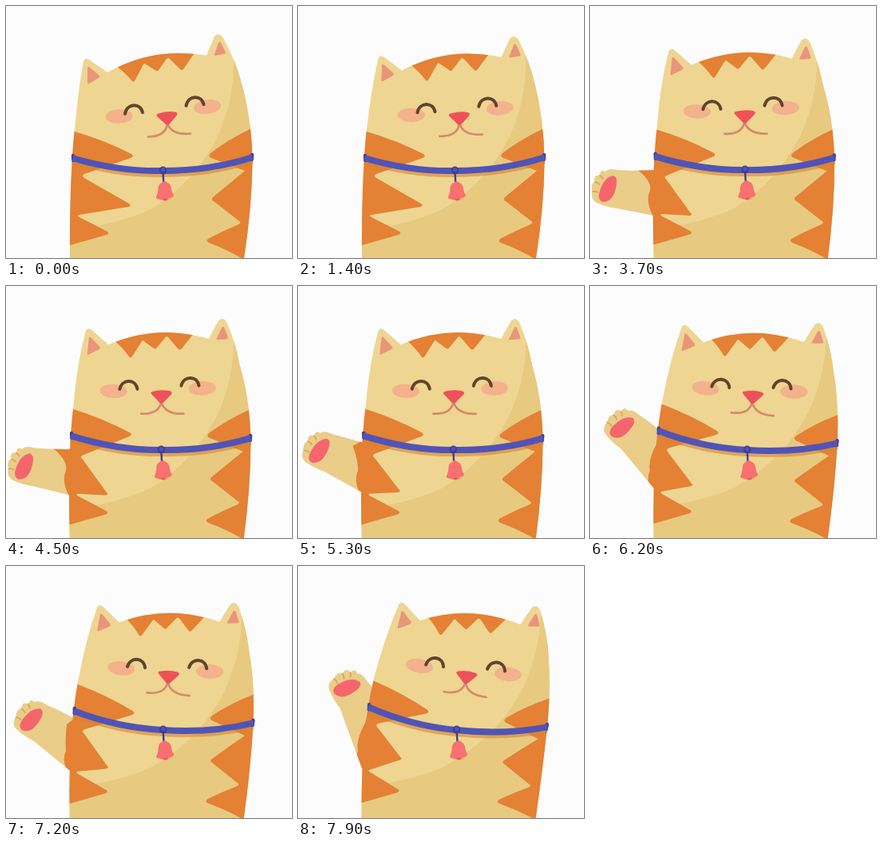
Write an HTML page with a canvas that moves like this. It is 358x315 px and loops after 8000 ms.

```html
<!DOCTYPE html>
<html lang="en">
<head>
<meta charset="utf-8">
<title>Waving cat</title>
<style>
html, body { margin: 0; width: 100%; height: 100%; overflow: hidden; background: #fcfcfc; }
canvas { display: block; width: 358px; height: 315px; }
</style>
</head>
<body>
<canvas id="stage"></canvas>
<script>
const W = 358, H = 315, LOOP = 8000, STEP = 100;
const canvas = document.getElementById('stage');
const ctx = canvas.getContext('2d');
const dpr = window.devicePixelRatio || 1;
canvas.width = W * dpr;
canvas.height = H * dpr;

const C = {
  bg: '#fcfcfc', fur: '#eed592', shade: '#e7ca7f', arm: '#e9cd89', stripe: '#e48134', ear: '#e9957a',
  blush: '#f3b28b', eye: '#62432c', nose: '#ee5159', mouth: '#d18c69',
  collar: '#5054b6', collarDark: '#3d3f93', shadow: 'rgba(214,134,48,.6)',
  bell: '#f9706f', bellDark: '#ea5560', pad: '#f4666c', toe: '#d9a255'
};

// Motion tables: [time, value], eased between turning points
const ARM = [[2800, 10], [3250, 28], [3700, 0], [4075, 35], [4450, 0], [4825, 35], [5170, 3],
  [5575, 40], [5950, 2], [6370, 42], [6700, 2], [7000, 42], [7360, 3], [7850, 46], [8200, 10]];
const REACH = [[2800, 0], [3250, 1]];
const LEAN = [[3700, 0], [4300, .08], [4750, 0], [5230, 0], [5575, .7], [5950, .3], [6370, .75],
  [6700, .45], [7000, .95], [7360, .3], [7850, 1]];
const EYES = [[0, 1], [2300, 1], [2700, .42], [3000, 1]];

// Poses: head turn, dx, dy, collar turn, dx, dy, face turn
const REST = [0, 0, 0, 0, 0, 0, 0];
const TURN = [4, .5, .3, 0, 0, 0, 3.6];
const LOW = [6, -8, -2, .7, -2.5, -1, 4];
const HIGH = [12, 9, -1, 6.6, 2.5, -1, 11.5];

const clamp = v => Math.max(0, Math.min(1, v));
const mix = (a, b, u) => a + (b - a) * u;
const blend = (a, b, u) => a.map((v, i) => mix(v, b[i], u));
const ease = u => (1 - Math.cos(Math.PI * clamp(u))) / 2;

function track(rows, t) {
  if (t <= rows[0][0]) return rows[0][1];
  for (let i = 1; i < rows.length; i++) {
    const [t0, a] = rows[i - 1], [t1, b] = rows[i];
    if (t <= t1) return mix(a, b, ease((t - t0) / (t1 - t0)));
  }
  return rows[rows.length - 1][1];
}

function spin(x, y, cx, cy, deg, scale = 1) {
  const r = deg * Math.PI / 180, c = Math.cos(r) * scale, s = Math.sin(r) * scale;
  return [cx + (x - cx) * c - (y - cy) * s, cy + (x - cx) * s + (y - cy) * c];
}

function poseAt(t) {
  if (t <= 2700) return blend(REST, TURN, t / 2700);
  if (t < 3700) return blend(TURN, LOW, ease((t - 2700) / 900));
  return blend(LOW, HIGH, track(LEAN, t));
}

// Point maps: the trunk bends up to the collar, the skin also follows the head, the face is rigid
function mapsFor([turn, dx, dy, collarTurn, cx, cy, faceTurn]) {
  const trunk = (x, y) => {
    const [nx, ny] = spin(x, y, 196, 204, collarTurn);
    return blend([x, y], [nx + cx, ny + cy], clamp((320 - y) / 120));
  };
  const skin = (x, y) => {
    const [hx, hy] = spin(x, y, 202, 155, turn);
    return blend(trunk(x, y), [hx + dx, hy + dy], ease((165 - y) / 85));
  };
  const face = (x, y) => {
    const [fx, fy] = spin(x, y, 202, 140, faceTurn);
    return [fx + dx, fy + dy];
  };
  return { trunk, skin, face };
}

const shape = (d, map) => new Path2D(
  d.replace(/(-?[\d.]+) (-?[\d.]+)/g, (m, x, y) => map(+x, +y).map(v => v.toFixed(2)).join(' ')));

function fill(path, color) {
  ctx.fillStyle = color;
  ctx.fill(path);
}

function line(path, color, width, cap = 'round') {
  ctx.strokeStyle = color;
  ctx.lineWidth = width;
  ctx.lineCap = cap;
  ctx.lineJoin = 'round';
  ctx.stroke(path);
}

function oval(x, y, rx, ry, deg, color) {
  ctx.fillStyle = color;
  ctx.beginPath();
  ctx.ellipse(x, y, rx, ry, deg * Math.PI / 180, 0, 2 * Math.PI);
  ctx.fill();
}

// Draws the arm and returns its outline
function drawArm(angle, reach) {
  const swing = (x, y) => spin(x, y, 136, 238, angle, mix(.3, 1, reach));
  const pt = (x, y) => swing(x, y).join(' ');
  const arm = new Path2D(`M108 203 Q${pt(64, 207)} ${pt(34, 205)} Q${pt(24, 202)} ${pt(19, 207)}` +
    `Q${pt(13, 203)} ${pt(12, 212)} Q${pt(4, 210)} ${pt(6, 220)} Q${pt(0, 222)} ${pt(3, 232)}` +
    `Q${pt(0, 243)} ${pt(11, 247)} Q${pt(20, 251)} ${pt(34, 253)}` +
    `L80 ${mix(262, 253, clamp(angle / 27))} L110 262 Z`);
  fill(arm, C.arm);
  line(shape('M12 212 Q15 213 16 216 M6 220 Q9 220 12 223 M3 232 Q6 231 10 233', swing), C.toe, 1.6);
  fill(shape('M29 212 Q36 214 32 229 Q28 245 16 245 Q8 242 13 229 Q18 214 29 212 Z', swing), C.pad);
  return arm;
}

// Orange patch that joins the arm to the body stripe
function drawShoulder(arm, angle) {
  const u = clamp(angle / 27), x = mix(57, 84, u), y = mix(203, 196, u);
  ctx.save();
  ctx.clip(arm);
  fill(new Path2D(`M${x} ${y} Q${mix(78, 72, u)} 218 75 231 Q69 243 79 263 L86 263 L86 190 Z`), C.stripe);
  ctx.restore();
}

function drawBody({ trunk, skin, face }, angle, reach) {
  const body = shape('M80 332 L80 315 Q79.5 240 83 190 Q84 168 86.5 150 Q90 108 97 69 Q99 64 104 67' +
    'L127 83 Q170 59 214 59 Q236 59 251 62 Q256 49 261 38 Q266 32 272 40 Q287 68 293 90' +
    'Q308 140 308.5 195 Q308 250 298 315 L296 332 Z', skin);
  fill(body, C.fur);
  ctx.save();
  ctx.clip(body);
  fill(shape('M284 45 Q290 110 264 165 Q236 220 183 253 Q142 273 75 281 L75 340 L320 340 L350 45 Z', trunk), C.shade);
  // The middle stripe is pulled along by the arm
  const u = angle / 45;
  const tx = mix(156, mix(129, 131, u), reach), ty = mix(250, mix(262, 247, u), reach);
  const ny = mix(212, mix(216, 210, u), reach);
  fill(shape('M60 149 L86 157 Q124 168 157 185 Q161 188 156 190 ' +
    `L98 ${ny - 2} Q94 ${ny} 98 ${ny + 3}` +
    `L${tx - 2} ${ty - 3} Q${tx + 2} ${ty} ${tx - 3} ${ty + 1} L92 261 Q88 262 92 264` +
    'L127 282 Q130 284 126 286 L80 299 L60 305 Z', skin), C.stripe);
  fill(shape('M325 143 L307 153 Q278 167 256 184 Q252 188 257 190 L299 206 Q282 220 259 239' +
    'Q256 242 260 244 L292 269 Q295 271 291 273 Q270 282 253 291 Q250 294 254 296' +
    'Q276 304 298 317 L325 330 Z', skin), C.stripe);
  fill(shape('M138 75 Q150 84 158 94 Q160 96 162 92 L172 73 Q173 71 175 73 L188 81 Q190 82 191 80' +
    'L201 66 Q203 64 205 66 L218 79 Q220 81 222 79 L238 56 L200 45 L136 60 Z', face), C.stripe);
  ctx.restore();
  fill(shape('M102 77 Q103 75 105 77 L117 87 Q118 88 116 90 L104 97 Q102 98 102 96 Z', skin), C.ear);
  fill(shape('M266 46 Q267 44 269 46 L275 58 Q275 60 273 60 L262 62 Q260 62 261 60 Z', skin), C.ear);
}

function drawFace(at, turn, open) {
  for (const [x, y, a] of [[141.5, 138, -2], [252, 126, -7]]) {
    const [bx, by] = at(x, y);
    oval(bx, by, 17, 8.8, turn + a, C.blush);
  }
  for (const [x, y] of [[160, 134], [236.5, 124]]) {
    const lift = 12.5 * open, base = y - 3 * (1 - open);
    line(shape(`M${x - 11} ${base + .8} C${x - 9} ${base - lift} ${x + 8} ${base - lift - 1} ${x + 11} ${base - 1}`, at),
      C.eye, 4);
  }
  line(shape('M202 147 Q200 163 178 163.5 M202 147 Q208 162 231 159.5', at), C.mouth, 2.7);
  fill(shape('M191 134.5 Q202 131 212 132.5 Q216 133.5 213.5 137 L205 147 Q202 150.5 199 147' +
    'L189 138 Q187 135.5 191 134.5 Z', at), C.nose);
}

function drawCollar(at) {
  const band = dy => shape(`M83 ${190 + dy} Q140 ${207 + dy} 196 ${206 + dy} Q256 ${206 + dy} 309 ${189 + dy}`, at);
  line(band(5), C.shadow, 6, 'butt');
  line(shape('M84 187 L84.5 193 M308 186 L307.5 192', at), C.collarDark, 4.5);
  line(band(0), C.collar, 8, 'butt');
  const [x, y] = at(196.5, 205.5);
  const hang = (px, py) => [x + px, y + py];
  line(shape('M0 2 L0.8 16', hang), C.collarDark, 2.4);
  oval(x, y, 4.6, 5, 0, C.collarDark);
  oval(x, y - 1, 2.6, 2.6, 0, C.collar);
  oval(x + 4, y + 33, 8, 5, -10, 'rgba(222,145,70,.45)');
  oval(x + 2.5, y + 34, 4, 3.6, 0, C.bellDark);
  fill(shape('M-1 15 Q2 12 5 15 Q10 17 10.5 23 Q11 28 13.5 31 Q13 34 9 34 Q6 36 2 35' +
    'Q-2 38 -5 36 Q-9 36 -8.5 33 Q-6 29 -6 23 Q-6 17 -1 15 Z', hang), C.bell);
}

function draw(t) {
  const pose = poseAt(t), maps = mapsFor(pose);
  const reach = track(REACH, t), angle = track(ARM, t);
  ctx.setTransform(dpr, 0, 0, dpr, 0, 0);
  ctx.fillStyle = C.bg;
  ctx.fillRect(0, 0, W, H);
  const arm = reach > 0 && drawArm(angle, reach);
  drawBody(maps, angle, reach);
  if (arm) drawShoulder(arm, angle);
  drawFace(maps.face, pose[6], track(EYES, t));
  drawCollar(maps.trunk);
}

const start = performance.now();
function tick() {
  const t = (performance.now() - start) % LOOP;
  draw(Math.floor(t / STEP) * STEP);
  requestAnimationFrame(tick);
}
tick();
</script>
</body>
</html>
```
